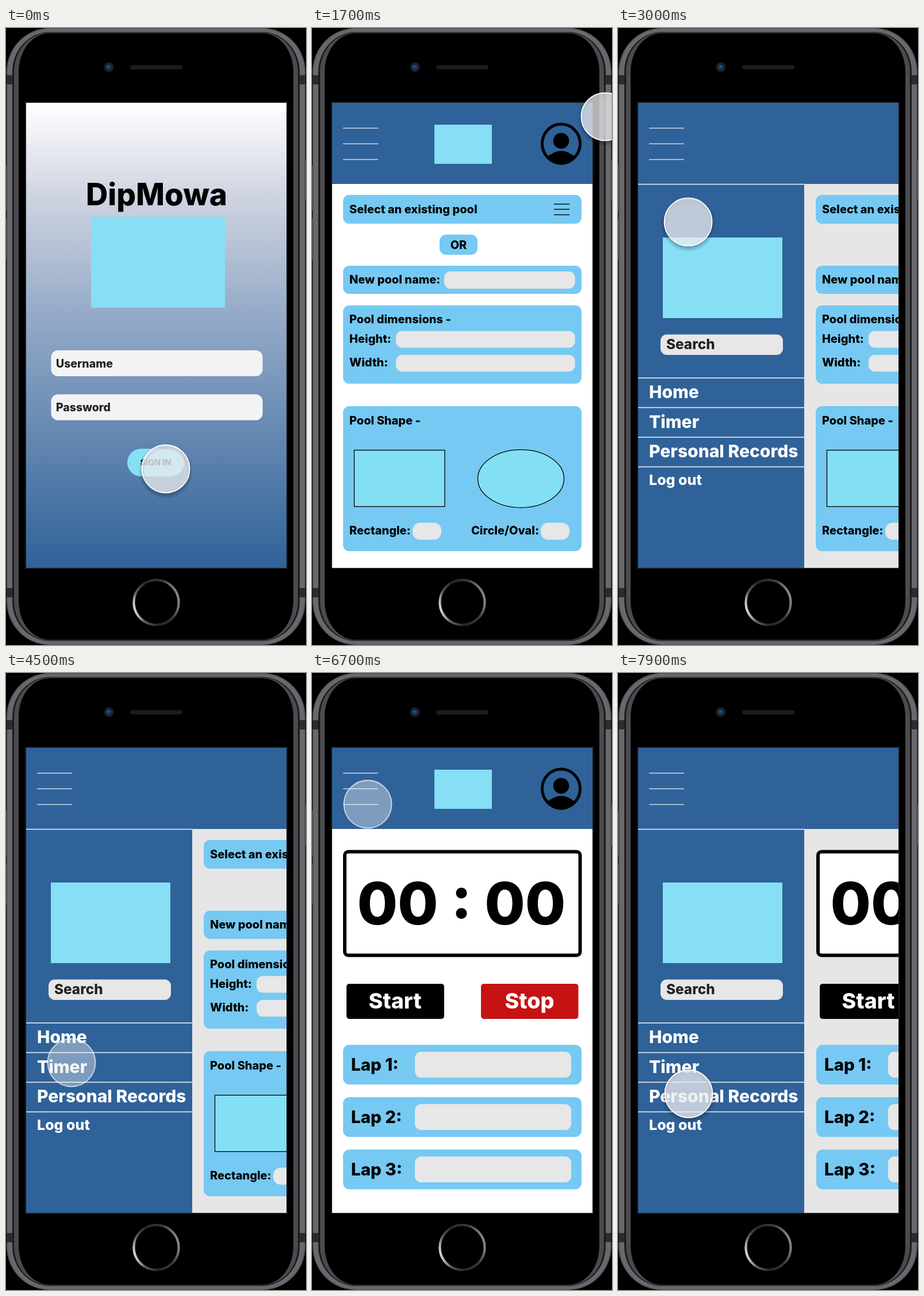
An HTML page that plays this animation: 522x1072 px, repeating every 8000 ms.

```html
<!DOCTYPE html>
<html lang="en">
<head>
<meta charset="utf-8">
<title>Pool app walkthrough</title>
<style>
  html, body { margin: 0; width: 100%; height: 100%; overflow: hidden; background: #000; }
  svg { display: block; width: 522px; height: 1072px; }
  text { font-family: Inter, sans-serif; font-weight: 800; }
</style>
</head>
<body>
<svg id="stage" viewBox="0 0 522 1072">
  <defs>
    <linearGradient id="sky" x2="0" y2="1">
      <stop stop-color="#fff"/>
      <stop offset=".2" stop-color="#cfd4e1"/>
      <stop offset=".45" stop-color="#96abc8"/>
      <stop offset="1" stop-color="#2f6299"/>
    </linearGradient>
    <linearGradient id="ring" y1=".65" y2=".35">
      <stop stop-color="#e0e0e0"/>
      <stop offset=".15" stop-color="#5a5a5a"/>
      <stop offset=".4" stop-color="#262626"/>
      <stop offset=".75" stop-color="#3a3a3a"/>
      <stop offset="1" stop-color="#8c8c8c"/>
    </linearGradient>
    <radialGradient id="shade">
      <stop offset=".78" stop-opacity="0"/>
      <stop offset=".8" stop-opacity=".3"/>
      <stop offset="1" stop-opacity="0"/>
    </radialGradient>
    <clipPath id="glass"><rect x="35" y="130" width="453" height="808"/></clipPath>
  </defs>
  <g id="phone"></g>
  <g id="screens" clip-path="url(#glass)"></g>
  <g id="cursor">
    <circle id="shadow" cy="4" r="48" fill="url(#shade)"/>
    <circle id="disc" r="41.5" fill="#ebebee" stroke="#fff" stroke-width="1.8"/>
  </g>
</svg>
<script>
const $ = id => document.getElementById(id);
const NAVY = '#2f6299', PANEL = '#76c9f2', WATER = '#86dff5', FIELD = '#e7e7e7';

// Shapes are given by their left, top, right and bottom edges.
const box = (l, t, r, b, fill, rx = 0, extra = '') =>
  `<rect x="${l}" y="${t}" width="${r - l}" height="${b - t}" rx="${rx}" fill="${fill}" ${extra}/>`;
const label = (x, y, str, size = 20, fill = '#000', anchor = 'start') =>
  `<text x="${x}" y="${y}" font-size="${size}" fill="${fill}" text-anchor="${anchor}">${str}</text>`;
const lines = (l, r, ys, color, width = 1.4) =>
  ys.map(y => `<path d="M${l} ${y}H${r}" stroke="${color}" stroke-width="${width}"/>`).join('');
const panel = (t, b) => box(54, t, 469, b, PANEL, 11);
const field = (l, t, r, b, rx = 11) => box(l, t, r, b, FIELD, rx);

// Nested layers of the casing: side inset, top inset, colour
const casing = (dx, dy, fill) => box(dx, dy, 522 - dx, 1072 - dy, fill, 76 - dx, `ry="${76 - dy}"`);
const phone =
  box(0, 238, 4, 318, '#45454a', 2) + box(0, 330, 4, 403, '#45454a', 2) + box(518, 228, 522, 301, '#45454a', 2) +
  casing(1, 0, '#56565a') + casing(3, 1.5, '#68686d') + casing(11, 7, '#1b1b1d') +
  casing(14, 8, '#4b4b4f') + casing(22, 9, '#000') +
  [82, 973].map(y => box(1, y, 11, y + 16, '#2c2c2f') + box(511, y, 521, y + 16, '#2c2c2f')).join('') +
  box(33, 128, 490, 940, '#1a1a1b') +
  '<circle cx="179" cy="68" r="8.5" fill="#1c2028"/><circle cx="179" cy="68" r="4.5" fill="#163a66"/>' +
  '<circle cx="178" cy="67" r="1.6" fill="#2f6fb0"/>' +
  box(216, 64.5, 307, 72, '#1c1c1d', 3.7) +
  '<circle cx="261.5" cy="998" r="39" fill="#000" stroke="url(#ring)" stroke-width="4.2"/>';

const burger = lines(54, 115, [174, 201.3, 228.5], '#ccd7e3', 1.6);
const profile =
  '<ellipse cx="433.5" cy="201" rx="33" ry="34" fill="none" stroke="#000" stroke-width="5"/>' +
  '<circle cx="433.5" cy="196" r="13.8"/><path d="M408 225Q433.5 202 459 225A33 34 0 0 1 408 225"/>';
const header = box(35, 130, 488, 271, NAVY) + burger + box(213, 168, 313, 236, WATER) + profile;

const login =
  box(35, 130, 488, 938, 'url(#sky)') +
  label(262, 308, 'DipMowa', 53, '#000', 'middle') +
  box(148, 328, 381, 486, WATER) +
  box(78.5, 560, 446.5, 605, '#f3f3f3', 12) + label(87, 590, 'Username', 19.5, '#222') +
  box(78.5, 636.5, 446.5, 681.5, '#f3f3f3', 12) + label(87, 666, 'Password', 19.5, '#222') +
  box(211, 731, 310, 779, WATER, 24) + label(260.5, 760, 'SIGN IN', 14.5, '#2b2f38', 'middle');

const poolForm =
  panel(290, 340) + label(65, 322, 'Select an existing pool') + lines(421, 448, [306, 315, 324.5], '#000') +
  box(222, 359, 288, 394, PANEL, 11) + label(255, 384, 'OR', 20, '#000', 'middle') +
  panel(413, 462) + label(65, 444, 'New pool name:') + field(230, 423, 457.5, 453) +
  panel(482, 618) + label(65, 513, 'Pool dimensions -') +
  label(65, 547, 'Height:') + field(146, 526.5, 457.5, 555.5) +
  label(65, 588, 'Width:') + field(146, 568, 457.5, 597) +
  panel(657, 909) + label(65, 689, 'Pool Shape -') +
  box(73.5, 733.5, 231, 831.5, '#83dff4', 0, 'stroke="#000" stroke-width="1.3"') +
  '<ellipse cx="363.5" cy="783" rx="75" ry="50.3" fill="#83dff4" stroke="#000" stroke-width="1.3"/>' +
  label(65, 880, 'Rectangle:') + field(175, 859.5, 225, 889, 13) +
  label(277, 880, 'Circle/Oval:') + field(398, 859.5, 448, 889, 13);

const lap = i => {
  const top = 646 + 91 * i;
  return panel(top, top + 69) + label(68, top + 45, `Lap ${i + 1}:`, 29.5) + field(179, top + 12, 451, top + 57);
};
const timerForm =
  box(57, 310.5, 466.5, 490.5, '#fff', 6, 'stroke="#000" stroke-width="6"') +
  label(260, 436.5, '00 : 00', 102, '#000', 'middle') +
  box(60, 540, 230, 601, '#000', 5) + label(144.5, 583, 'Start', 37.5, '#fff', 'middle') +
  box(294, 540, 463.5, 601, '#c61212', 5) + label(378.5, 583, 'Stop', 37.5, '#fff', 'middle') +
  [0, 1, 2].map(lap).join('');

const drawer =
  box(35, 130, 488, 271, NAVY) + box(35, 271, 324, 938, NAVY) + burger +
  box(78, 364, 286, 504, WATER) +
  field(74, 532.5, 287, 568) + label(84, 558, 'Search', 24.3, '#222') +
  lines(35, 324, [271.5, 608, 659.5, 711, 762.5], '#f4f7fa') +
  ['Home', 'Timer', 'Personal Records'].map((s, i) => label(54, 643 + 51.5 * i, s, 30, '#fff')).join('') +
  label(54, 794, 'Log out', 25, '#fff');

const page = form => box(35, 130, 488, 938, '#fff') + header + form;
const menu = (form, shift) =>
  box(35, 130, 488, 938, '#e6e6e6') + `<g transform="translate(${shift})">${form}</g>` + drawer;

$('phone').innerHTML = phone;
$('screens').innerHTML = [login, page(poolForm), menu(poolForm, 290), page(timerForm), menu(timerForm, 291)]
  .map(s => `<g>${s}</g>`).join('');
const screens = [...$('screens').children];

const LOOP = 8000;
const presses = [150, 2150, 4350, 6550];
// Cursor path: time, x, y
const path = [
  [0, 278, 766], [700, 278, 766], [1000, 400, 610], [1300, 575, 400], [1600, 575, 160], [1700, 511, 154],
  [1900, 300, 170], [2150, 97, 215], [2500, 97, 222], [2700, 100, 240], [3000, 122, 336], [3200, 138, 530],
  [3400, 142, 690], [3700, 116, 665], [3900, 116, 665], [4200, 114, 677], [4800, 114, 677], [5100, 117, 610],
  [5400, 119, 510], [5700, 116, 410], [6100, 103, 285], [6450, 97, 228], [7000, 97, 228], [7200, 102, 290],
  [7500, 116, 460], [7700, 124, 630], [7900, 123, 731], [8000, 123, 735]
];

const ramp = (t, from, to) => Math.min(1, Math.max(0, (t - from) / (to - from)));

function cursorAt(t) {
  const i = path.findIndex(p => p[0] > t);
  const [t0, x0, y0] = path[i - 1], [t1, x1, y1] = path[i];
  const k = ramp(t, t0, t1);
  return [x0 + (x1 - x0) * k, y0 + (y1 - y0) * k];
}

function draw() {
  const t = performance.now() % LOOP;
  let pressed = 0;
  presses.forEach((p, i) => {
    pressed += ramp(t, p, p + 130) - ramp(t, p + 350, p + 500);
    const shown = ramp(t, p + 170, p + 330);
    screens[i + 1].setAttribute('opacity', shown);
    screens[i + 1].setAttribute('visibility', shown ? 'visible' : 'hidden');
  });
  const [x, y] = cursorAt(t);
  $('cursor').setAttribute('transform', `translate(${x} ${y})`);
  $('shadow').setAttribute('opacity', 1 - pressed);
  $('disc').setAttribute('fill-opacity', .76 - .34 * pressed);
  $('disc').setAttribute('stroke-opacity', 1 - .3 * pressed);
  requestAnimationFrame(draw);
}
draw();
</script>
</body>
</html>
```
